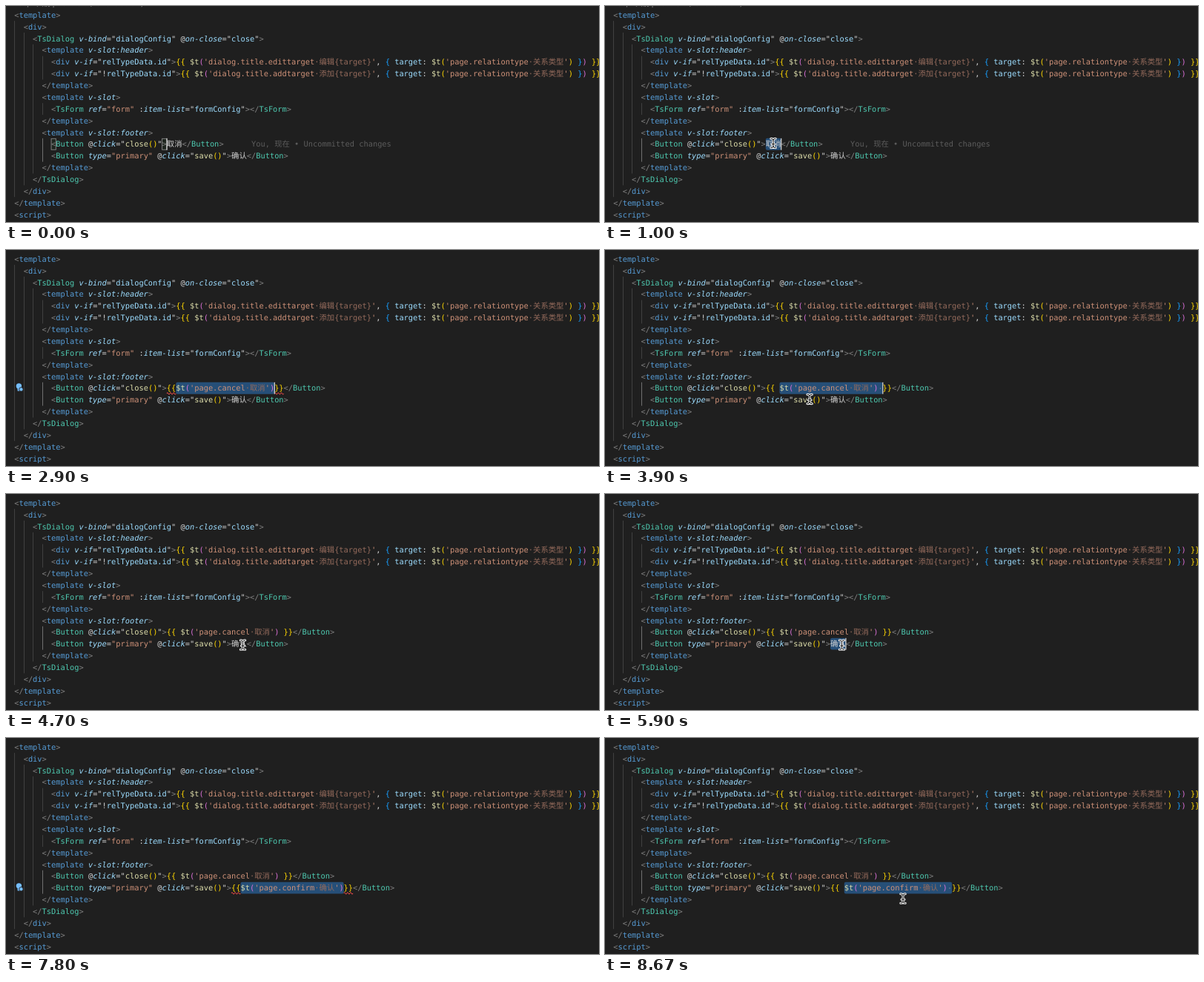
These frames come from a looping animation (800 by 292 pixels, 8850 ms). An HTML page:

```html
<!DOCTYPE html>
<html lang="en">
<head>
<meta charset="utf-8">
<title>Editor: wrapping labels for translation</title>
<style>
html, body { margin: 0; width: 100%; height: 100%; overflow: hidden; background: #1f1f1f; }
svg { display: block; width: 800px; height: 292px; }
text {
  font: 10.35px "DejaVu Sans Mono", "Noto Sans CJK SC", "Noto Sans CJK", monospace;
  white-space: pre; text-rendering: geometricPrecision;
}
.g { fill: #808080 } .b { fill: #569cd6 } .c { fill: #4ec9b0 }
.a { fill: #9cdcfe; font-style: italic } .v { fill: #9cdcfe }
.w { fill: #d4d4d4 } .s { fill: #ce9178 } .f { fill: #dcdcaa }
.b1 { fill: #ffd700 } .b2 { fill: #da70d6 } .b3 { fill: #179fff }
.note { fill: #956b5c } .blame { fill: #5c5c5c }
#lens { font: 9.3px Inter, "Noto Sans CJK SC", sans-serif; fill: #999 }
</style>
</head>
<body>
<svg viewBox="0 0 800 292">
  <rect width="800" height="292" fill="#1f1f1f"/>
  <g id="guides"></g>
  <g id="back"></g>
  <text id="lens" x="11.5" y="-.3">You, 7 天前 | 2 authors (You and others)</text>
  <g id="code"></g>
  <g id="live"></g>
  <g id="front"></g>
  <g id="mouse" visibility="hidden" stroke-linecap="round" fill="none">
    <g id="halo" stroke="#fff" stroke-width="3"></g>
    <g id="beam" stroke="#111"></g>
  </g>
</svg>
<script>
const LOOP = 8850, SIZE = 10.35, CELL = SIZE * 0.60205, LEFT = 11.2, PITCH = 15.88;
const $ = id => document.getElementById(id);
const column = n => LEFT + n * CELL;
const center = row => 12.1 + row * PITCH;
const rowTop = row => center(row) - PITCH / 2;
const width = s => [...s].reduce((sum, ch) => sum + (ch >= '\u4e00' && ch <= '\u9fff' ? SIZE : CELL), 0);
const escapeText = s => s.replace(/&/g, '&amp;').replace(/</g, '&lt;');

// Tokens are [class, text] pairs.
const kind = name => /^[A-Z]/.test(name) ? 'c' : 'b';
const openTag = (name, ...attrs) => [['g', '<'], [kind(name), name], ...attrs.flat(), ['g', '>']];
const closeTag = name => [['g', '</'], [kind(name), name], ['g', '>']];
const attr = (name, ...value) => {
  const prefix = /^[@:]/.test(name) ? name[0] : '';
  const tokens = [['w', ' ' + prefix], ['a', name.slice(prefix.length)]];
  return value.length ? [...tokens, ['w', '="'], ...value, ['w', '"']] : tokens;
};
const plainAttr = (name, value) => [['w', ' '], ['a', name], ['w', '='], ['s', `"${value}"`]];
const call = fn => [['f', fn], ['b1', '()']];
const translate = (key, note, bracket, ...rest) => [
  ['f', '$t'], [bracket, '('], ['s', "'" + key], ['note', '·' + note], ['s', "'"], ...rest, [bracket, ')']];
const titleLine = (negate, key, note) => [
  ...openTag('div', attr('v-if', ['w', negate], ['v', 'relTypeData.id'])),
  ['b1', '{{ '],
  ...translate('dialog.title.' + key, note + '{target}', 'b2',
    ['w', ', '], ['b3', '{ '], ['v', 'target'], ['w', ': '],
    ...translate('page.relationtype', '关系类型', 'b1'), ['b3', ' }']),
  ['b1', ' }}']];

function line(row, indent, tokens) {
  let x = column(indent);
  const spans = tokens.map(([cls, s]) => {
    const span = `<tspan class="${cls}" x="${x.toFixed(2)}">${escapeText(s)}</tspan>`;
    x += width(s);
    return span;
  });
  return `<text y="${(center(row) + 3.7).toFixed(2)}">${spans.join('')}</text>`;
}

const fixedLines = [
  [0, 0, openTag('template')],
  [1, 2, openTag('div')],
  [2, 4, openTag('TsDialog', attr('v-bind', ['v', 'dialogConfig']), attr('@on-close', ['v', 'close']))],
  [3, 6, openTag('template', attr('v-slot:header'))],
  [4, 8, titleLine('', 'edittarget', '编辑')],
  [5, 8, titleLine('!', 'addtarget', '添加')],
  [6, 6, closeTag('template')],
  [7, 6, openTag('template', attr('v-slot'))],
  [8, 8, [...openTag('TsForm', plainAttr('ref', 'form'), attr(':item-list', ['v', 'formConfig'])), ...closeTag('TsForm')]],
  [9, 6, closeTag('template')],
  [10, 6, openTag('template', attr('v-slot:footer'))],
  [13, 6, closeTag('template')],
  [14, 4, closeTag('TsDialog')],
  [15, 2, closeTag('div')],
  [16, 0, closeTag('template')],
  [17, 0, openTag('script')]];
$('code').innerHTML = fixedLines.map(args => line(...args)).join('');

const guide = (indent, first, last, color = '#404040') =>
  `<rect x="${Math.round(column(indent))}" y="${rowTop(first)}" width="1" height="${(last - first + 1) * PITCH}" fill="${color}"/>`;
$('guides').innerHTML = guide(0, 1, 15) + guide(2, 2, 14) + guide(4, 3, 13) +
  guide(6, 4, 5) + guide(6, 8, 8) + guide(6, 11, 12, '#707070');

$('halo').innerHTML = $('beam').innerHTML =
  '<path d="M-3.2-6.3Q0-6.3 0-4.2Q0-6.3 3.2-6.3M0-4.2V4.2M-3.2 6.3Q0 6.3 0 4.2Q0 6.3 3.2 6.3M-2 1.2H2"/>';

const buttons = [
  { row: 11, label: '取消', key: 'page.cancel',
    head: openTag('Button', attr('@click', ...call('close'))),
    select: 900, wrap: 1300, warn: 1500, replace: 1900, bulb: 2600, space: 3500, clean: 3800, leave: 4700 },
  { row: 12, label: '确认', key: 'page.confirm',
    head: openTag('Button', plainAttr('type', 'primary'), attr('@click', ...call('save'))),
    select: 4900, wrap: 6200, warn: 6400, bulb: 6800, replace: 7300, space: 8000, clean: 8200, leave: LOOP }];
for (const b of buttons) b.start = column(8) + width(b.head.map(token => token[1]).join(''));

function content(b, t) {
  const pad = t >= b.space ? ' ' : '';
  if (t < b.wrap) return [['w', b.label]];
  const inner = t < b.replace ? [['w', b.label]] : translate(b.key, b.label, 'b2');
  return [['b1', '{{' + pad], ...inner, ['b1', pad + '}}']];
}

function selection(b, t) {
  const from = b.start + (t < b.wrap ? 0 : t < b.space ? 2 : 3) * CELL;
  const inner = t < b.replace ? b.label : `$t('${b.key}·${b.label}')`;
  return [from, from + width(inner) + (t >= b.space ? CELL : 0)];
}

const squiggle = (x, row) =>
  `<path d="M${x} ${rowTop(row) + 15.2}${'q1.04-2.6 2.08 0t2.08 0'.repeat(3)}" fill="none" stroke="#f14c4c"/>`;
const caretAt = (x, row) =>
  `<rect x="${x - .5}" y="${rowTop(row)}" width="1.3" height="${PITCH}" fill="#d0d0d0"/>`;
const bracketBox = (x, row) =>
  `<rect x="${x}" y="${rowTop(row) + .5}" width="${CELL}" height="${PITCH - 1}" fill="#1f261f" stroke="#888" stroke-width=".9"/>`;
const bulbAt = row => `<g transform="translate(17.4 ${center(row) - 2.8})" fill="#75beff">
  <circle r="3.7"/><path d="M-1.8 3h3.6v3.6h-3.6z"/>
  <circle cx="3" cy="4.4" r="2.7" stroke="#1f1f1f" stroke-width=".9"/></g>`;

// Each pass: waypoints [time, x, y], then the time the pointer hides.
const passes = [
  { points: [[400, 290, 215], [800, 227, 185.5]], end: 1300 },
  { points: [[3800, 262, 192], [3900, 276, 201.5], [4300, 319.5, 204]], end: 6200 },
  { points: [[8670, 402, 217]], end: LOOP }];

function pointer(t) {
  const pass = passes.find(p => t >= p.points[0][0] && t < p.end);
  if (!pass) return null;
  const i = pass.points.filter(p => p[0] <= t).length - 1;
  const [t0, x0, y0] = pass.points[i], next = pass.points[i + 1];
  if (!next) return [x0, y0];
  const k = (t - t0) / (next[0] - t0);
  return [x0 + (next[1] - x0) * k, y0 + (next[2] - y0) * k];
}

function put(id, html) {
  const node = $(id);
  if (node.shown !== html) node.innerHTML = node.shown = html;
}

function draw(t) {
  const active = buttons.find(b => t < b.leave);
  const { row, start } = active;
  const [from, to] = selection(active, t);
  let back = '', front = '';

  if (t >= active.select) {
    back += `<rect x="${from}" y="${rowTop(row)}" width="${to - from}" height="${PITCH}" rx="2" fill="#264f78"/>`;
    if (t >= active.space) front += `<circle cx="${to - CELL / 2}" cy="${center(row) + .3}" r=".7" fill="#8496a8"/>`;
  } else if (row === 11) {
    back += bracketBox(column(8), row) + bracketBox(start - CELL, row);
  }
  if (t >= active.warn && t < active.clean) front += squiggle(start, row) + squiggle(to, row);
  if (t >= active.bulb && t < active.clean) front += bulbAt(row);

  // The caret blinks every half second, restarting after each edit.
  const edits = ['select', 'wrap', 'warn', 'replace', 'space'].map(step => active[step]);
  const lastEdit = Math.max(0, ...edits.filter(time => time <= t));
  const blinkOn = Math.floor((t - lastEdit) / 500) % 2 === 0;
  if (blinkOn && t >= active.select) front += caretAt(to, row);
  if (blinkOn && t < buttons[0].select) front += caretAt(start, row);

  const blame = t < buttons[0].wrap
    ? `<text class="blame" x="331" y="${center(11) + 3.7}">You, 现在 • Uncommitted changes</text>` : '';
  put('live', buttons.map(b => line(b.row, 8, [...b.head, ...content(b, t), ...closeTag('Button')])).join('') + blame);
  put('back', back);
  put('front', front);
  $('lens').setAttribute('visibility', t < 2600 ? 'visible' : 'hidden');

  const at = pointer(t);
  $('mouse').setAttribute('visibility', at ? 'visible' : 'hidden');
  if (at) $('mouse').setAttribute('transform', `translate(${at[0]} ${at[1]})`);
}

const begin = performance.now();
function tick() {
  draw((performance.now() - begin) % LOOP);
  requestAnimationFrame(tick);
}
tick();
</script>
</body>
</html>
```
